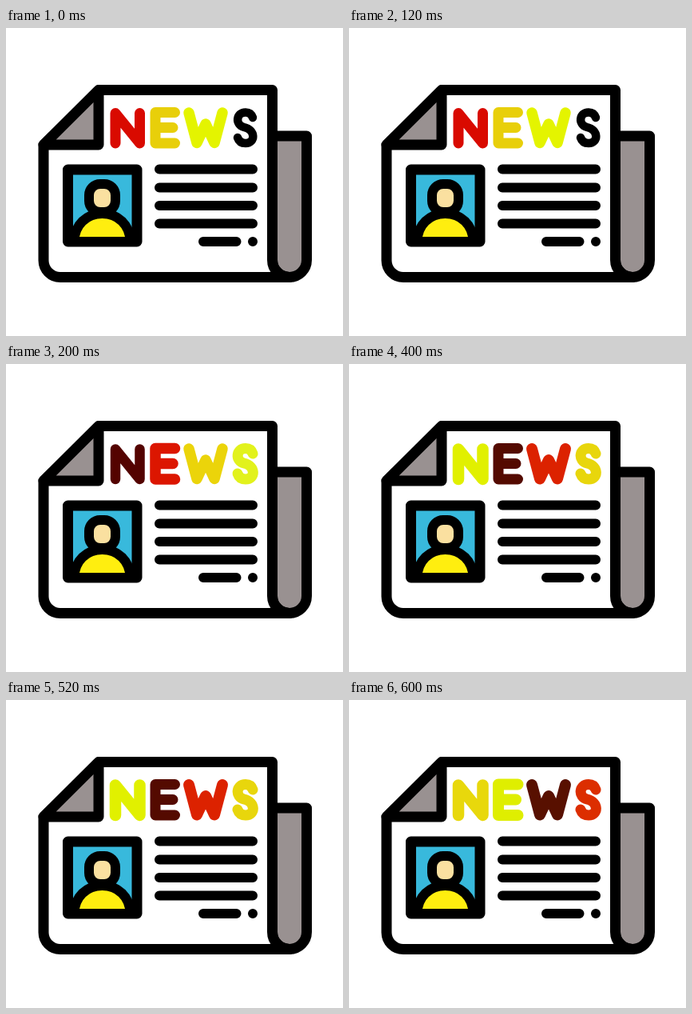
An HTML page that plays this animation: 422x385 px, repeating every 800 ms.

```html
<!DOCTYPE html>
<html lang="en">
<head>
<meta charset="utf-8">
<title>News</title>
<style>
  html, body { margin: 0; width: 100%; height: 100%; overflow: hidden; background: #fff; }
  svg { display: block; width: 100vw; height: 100vh; }
  .ink { fill: none; stroke: #000; stroke-width: 12; stroke-linecap: round; stroke-linejoin: round; }
  .edge { stroke-width: 13; }
  .paper { fill: #fff; }
  .shade { fill: #999191; }
  .sky { fill: #38b9dc; }
  .skin { fill: #fae0a0; }
  .shirt { fill: #ffee0f; }
  #title path { fill: none; stroke-linecap: round; stroke-linejoin: round; }
</style>
</head>
<body>
<svg viewBox="0 0 422 385" role="img" aria-label="Newspaper with the headline NEWS">
  <!-- rolled back page -->
  <path class="ink edge shade" d="M333.500 135H376.500V290A21.500 21.500 0 0 1 333.500 290Z"/>
  <!-- front page -->
  <path class="ink edge paper" d="M116 77.500H333.500V290A21.500 21.500 0 0 0 355 311.500H68A21 21 0 0 1 47 290.500V146Z"/>
  <path class="ink edge shade" d="M116 77.500V146H47Z"/>
  <!-- portrait -->
  <rect class="ink edge sky" x="77.500" y="177" width="86.500" height="90"/>
  <path class="ink shirt" d="M85.500 267C85.500 246 101 232 120.500 232S155.500 246 155.500 267Z"/>
  <rect class="ink skin" x="104" y="195" width="33" height="35" rx="14"/>
  <!-- article -->
  <path class="ink" d="M192 176.500H309M192 199.500H309M192 222H309M192 244.500H309M247 267H288.500M309 267h.01"/>
  <g id="title">
    <path d="M137 144V106.500L167.500 144V106.500"/>
    <path d="M211.500 105.500H187V144H211.500M187 124.500H209"/>
    <path d="M229 106L239 143.500L250 120L261 143.500L271 106"/>
    <path d="M309 112C307.500 107.500 304.500 105.500 300 105.500C288 105.500 286.500 121 298 124C313 127.500 312.500 144 300 144C294.500 144 291.500 141.500 290 137"/>
  </g>
</svg>
<script>
  const LOOP = 800;

  // Per letter: [colour, stroke width] for each quarter of the loop.
  const steps = [
    [['#d90a00', 13], ['#540300', 12.5], ['#e1f000', 14.5], ['#e8d80c', 14.5]],
    [['#e8cf0a', 13], ['#dc1600', 13.5], ['#540a00', 13], ['#dfee00', 14]],
    [['#e4f400', 13.5], ['#ebd40a', 13.5], ['#dc2200', 14], ['#581000', 14]],
    [['#000000', 10.5], ['#e2f21c', 13], ['#e8d60c', 13], ['#dc2e00', 13]]
  ];

  const keyframe = ([stroke, width], i, list) => ({
    stroke,
    strokeWidth: width + 'px',
    offset: i / (list.length - 1),
    easing: 'steps(1, end)'
  });

  document.querySelectorAll('#title path').forEach((letter, i) => {
    const cycle = [...steps[i], steps[i][0]];
    const anim = letter.animate(cycle.map(keyframe), { duration: LOOP, iterations: Infinity });
    anim.startTime = 0;
  });
</script>
</body>
</html>
```
